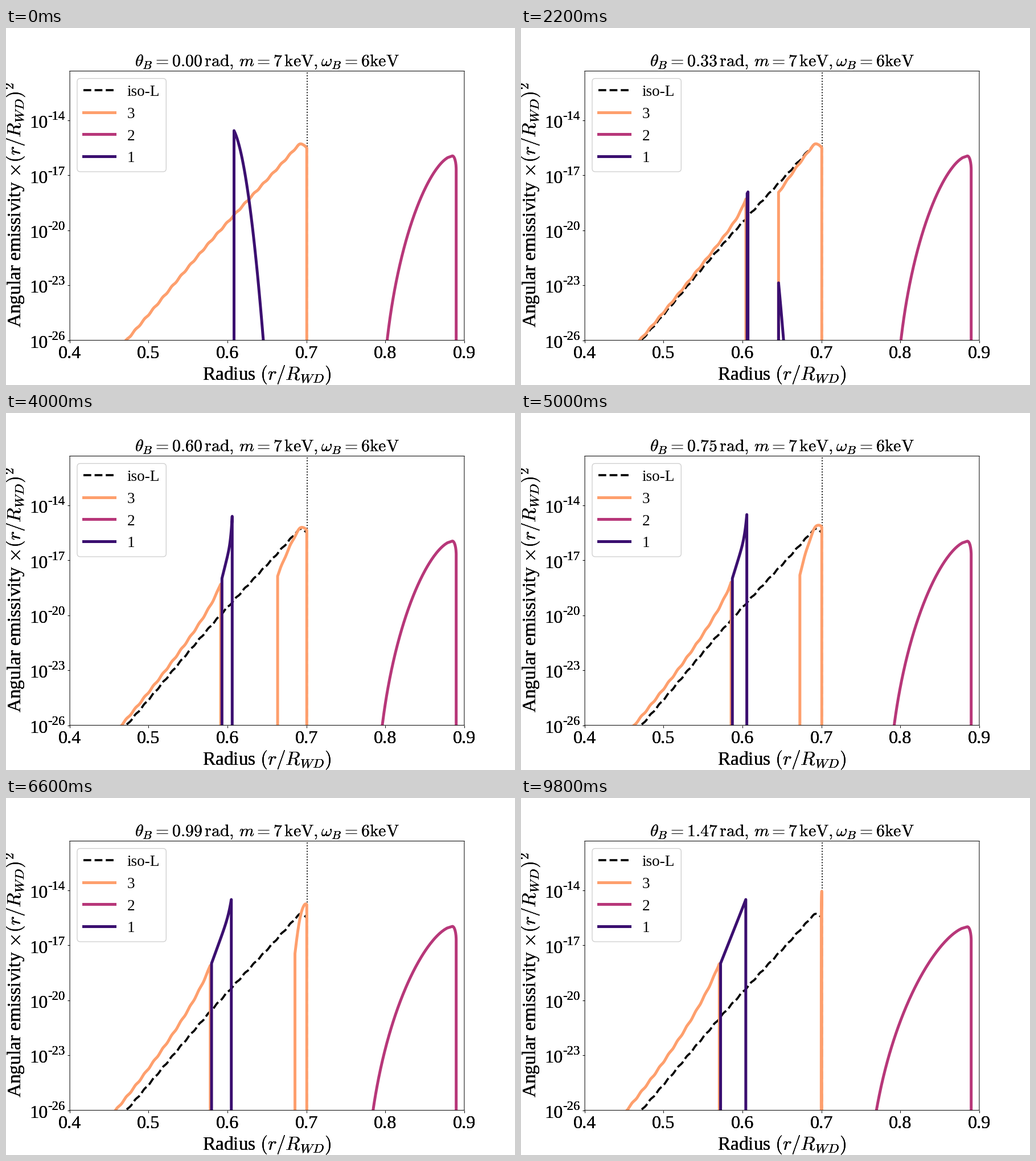
Animation of 894 by 626 pixels, one loop 10 s. Source, as a matplotlib script:

```python
import numpy as np
import matplotlib.pyplot as plt
from matplotlib.animation import FuncAnimation
from matplotlib.patches import FancyBboxPatch

W, H, DPI = 894, 626, 100
PT = 72 / DPI                                   # points per pixel
LEFT, RIGHT, TOP, BOTTOM = 112.1, 804.9, 75.5, 547.6
FLOOR = 600                                     # below the visible axis
CROSS = 422                                     # where the two modes meet
SPIKE_X, SPIKE_Y = 400.5, 180
END_X = 528.3                                   # right end of mode 3
ORANGE, MAGENTA, PURPLE = "#fe9f6d", "#b73779", "#3b0f70"
FRAMES, STEP = 50, 0.03

plt.rcParams["font.family"] = "Liberation Serif"
plt.rcParams["mathtext.fontset"] = "cm"


# Curves are in stage pixels, y pointing down.
def iso(x):
    """Nearly straight rise that rounds off just before END_X."""
    d = x - 212
    bow = 6 * np.sin(np.pi * d / 298)**2
    ripple = np.cos(2 * np.pi * (x - 291) / 16)
    cap = 22 * np.clip((x - 506) / 22, 0, None)**3
    return 547 - 1.134 * d - bow - ripple + cap


def spike(x):
    d = x - SPIKE_X
    return SPIKE_Y + 2 * d + 0.1 * d**2


def piece(x, y):
    """Curve piece closed by vertical drops, followed by a gap."""
    return np.vstack([[x[0], FLOOR], np.column_stack([x, y]),
                      [x[-1], FLOOR], [np.nan, np.nan]])


def gap_edges(theta):
    s = np.sin(theta)
    mid, half = CROSS + 16 * s**2, 88.5 * s + 1.5 * s**8
    return mid - half, mid + half


def orange_curve(theta):
    s = np.sin(theta)
    lo, hi = gap_edges(theta)
    if theta == 0:
        x = np.linspace(180, END_X, 200)
        return piece(x, iso(x))
    x = np.linspace(180, lo, 120)
    d = CROSS - x
    left = piece(x, iso(x) - (6900 / d + 1.6e6 / d**3) * s**2)

    u = np.linspace(0, 1, 80)
    x = hi + (END_X - hi) * u
    drop = 60 * np.sin(np.pi * (theta / 1.5)**1.6)
    lift = 48 * s**4
    right = piece(x, iso(x) - lift + (drop + lift) * (1 - u)**1.8)
    return np.vstack([left, right])


def purple_curve(theta):
    if theta == 0:
        x = np.linspace(SPIKE_X, 456, 40)
        return piece(x, spike(x))
    lo, hi = gap_edges(theta)
    lo += 2.2
    wall = SPIKE_X - 5.7 * np.sin(theta)
    height = 112 * (1 - np.exp(-((lo - wall) / 9.5)**2))
    t = np.linspace(0, 1, 40)
    if lo > wall:
        rise = 1 - (1 - t)**1.4
    else:
        bend = 0.5 * np.cos(theta)**2
        rise = (1 - bend) * t + bend * t**7
    parts = [piece(lo + (wall - lo) * t, 290 - height * rise)]

    shift = 28 * theta
    if hi < 452 + shift:
        x = np.linspace(hi, 456 + shift, 30)
        parts.append(piece(x, spike(x - shift)))
    return np.vstack(parts)


def magenta_curve(theta):
    w = ((1 - np.cos(theta)) / 0.9 + np.sin(theta)**3) / 2
    peak = 224.3 + 1.5 * w
    v = np.linspace(1.1, 0, 120)
    reach = 1.2 * v**(0.6 + 0.03 * w) - 0.2 * v**2
    flank = np.column_stack([784 - (114.5 + 45.5 * w) * reach,
                             peak + (547 - peak) * v])
    a = np.linspace(0, np.pi / 2, 15)
    cap = np.column_stack([784 + 6.7 * np.sin(a),
                           peak + 24 * (1 - np.cos(a))])
    return np.vstack([flank, cap, [790.7, FLOOR]])


fig = plt.figure(figsize=(W / DPI, H / DPI), dpi=DPI, facecolor="white")
ax = fig.add_axes([LEFT / W, 1 - BOTTOM / H,
                   (RIGHT - LEFT) / W, (BOTTOM - TOP) / H])
ax.set(xlim=(LEFT, RIGHT), ylim=(BOTTOM, TOP))


def put(x, y, s, size, ha="center", layers=3, **kw):
    """Stacked copies harden the soft glyph edges."""
    return [ax.text(x, y, s, fontsize=size * PT, ha=ha, va="baseline", **kw)
            for _ in range(layers)]


def line(color, width, x=(), y=(), **kw):
    return ax.plot(x, y, color=color, lw=width * PT, **kw)[0]


# Axes, ticks and labels
xticks = LEFT - 0.3 + 138.57 * np.arange(6)
yticks = BOTTOM - 96.4 * np.arange(5)
ax.set_xticks(xticks[1:], [""] * 5)
ax.set_yticks(yticks, [""] * 5)
ax.set_xticks([LEFT], [""], minor=True)
ax.tick_params(which="both", length=4.35 * PT, width=1 * PT)
ax.set(xlim=(LEFT, RIGHT), ylim=(BOTTOM, TOP))
for spine in ax.spines.values():
    spine.set_linewidth(1 * PT)
    spine.set_snap(False)
for k, x in enumerate(xticks):
    put(x, 578.6, f"0.{4 + k}", 32.3)
for k, y in enumerate(yticks):
    put(73.2, y + 13.3, "10", 32.3, "right")
    put(103.5, y - 0.8, f"{3 * k - 26}", 22.6, "right")
put(458.5, 616.5, r"Radius $(r/R_{WD})$", 33.4)
put(27, 310.5, r"Angular emissivity $\times(r/R_{WD})^2$", 33.4,
    rotation=90, rotation_mode="anchor")
titles = put(458.3, 67.6, "", 29.8)

# Curves
line("black", 1.86, [529, 529], [BOTTOM, TOP], ls=":")
iso_x = np.linspace(212, END_X, 160)
line("black", 3.7, np.append(iso_x, END_X), np.append(iso(iso_x), FLOOR),
     ls="--")
curves = [(line(ORANGE, 5), orange_curve),
          (line(MAGENTA, 5), magenta_curve),
          (line(PURPLE, 5), purple_curve)]

# Legend
ax.add_patch(FancyBboxPatch(
    (125, 88.5), 156.3, 163.5, boxstyle="round,pad=0,rounding_size=5.5",
    fc=(1, 1, 1, 0.8), ec="0.8", lw=1.24 * PT, zorder=4))
entries = [("iso-L", "black", 3.7, "--"), ("3", ORANGE, 5, "-"),
           ("2", MAGENTA, 5, "-"), ("1", PURPLE, 5, "-")]
for k, (name, color, width, style) in enumerate(entries):
    y = 109 + 38.7 * k
    line(color, width, [136, 190.6], [y, y], ls=style, zorder=5)
    put(212.4, y + 10.2, name, 27.3, "left", layers=1, zorder=5)


def draw(i):
    theta = STEP * i
    for title in titles:
        title.set_text(rf"$\theta_B = {theta:.2f}\,\mathrm{{rad}},\,m = 7\,"
                       r"\mathrm{keV}, \omega_B = 6\mathrm{keV}$")
    for artist, curve in curves:
        artist.set_data(*curve(theta).T)
    return titles + [artist for artist, _ in curves]


anim = FuncAnimation(fig, draw, frames=FRAMES, interval=200, repeat=True)
plt.show()
```
